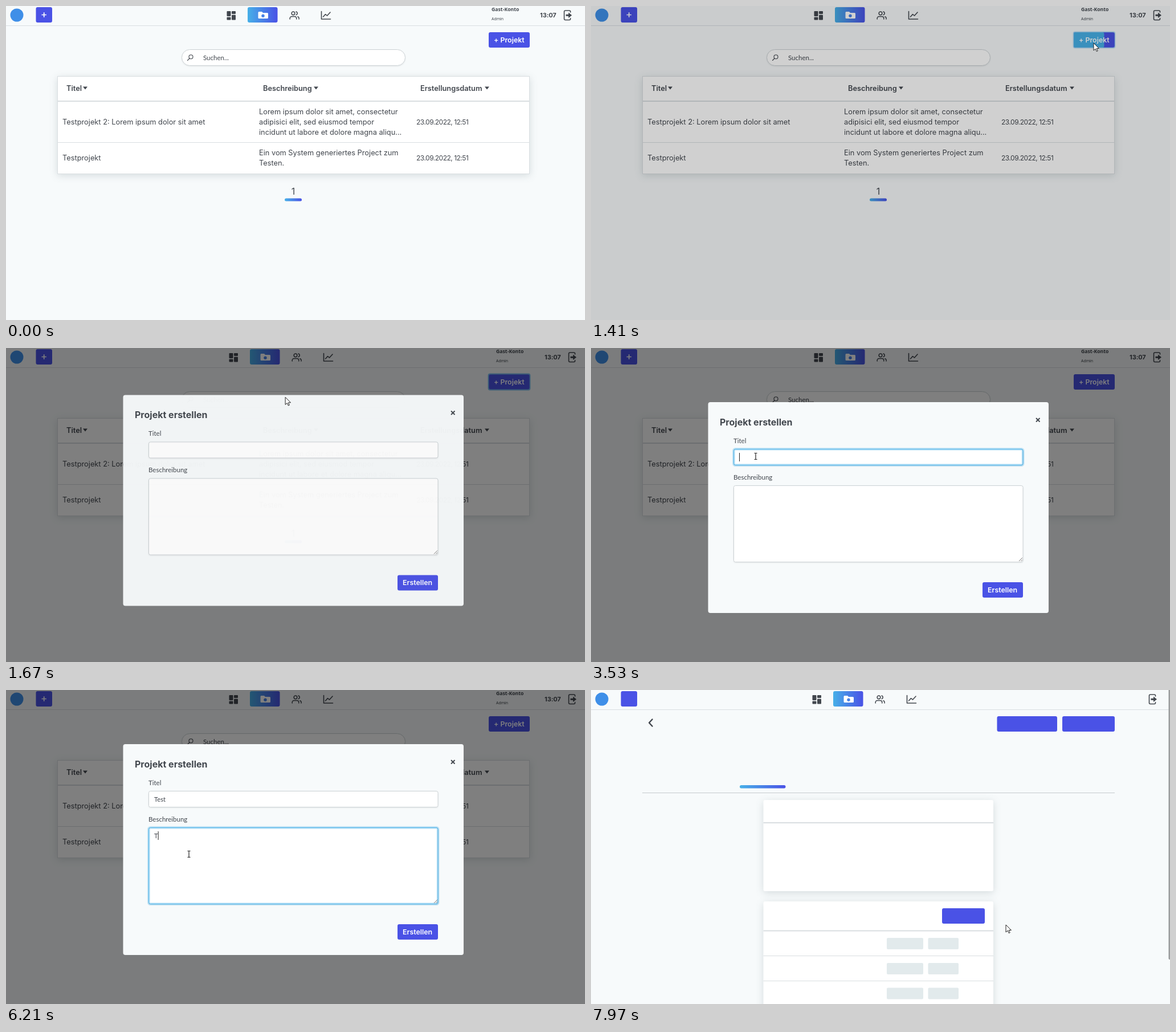
An HTML page for the animation above (8000 ms loop, 1016 by 551 pixels).

```html
<!DOCTYPE html>
<html lang="de">
<head>
<meta charset="utf-8">
<title>Projekt erstellen</title>
<style>
  html, body { margin: 0; width: 100%; height: 100%; overflow: hidden; background: #f7fafb; }
  svg { display: block; width: 100vw; height: 100vh; }
  text { font: 12.8px Inter, sans-serif; fill: #42474e; white-space: pre; }
  text.head { font-weight: 600; }
  text.date { font-size: 12px; letter-spacing: -.5px; }
  text.form { font: 11.5px Lato, sans-serif; }
  text.on-button { font-weight: 600; font-size: 12.4px; fill: #fff; }
  .button { fill: #4a52e6; }
  .light { fill: #47b0e8; }
  .card { fill: #fff; filter: drop-shadow(0 3px 7px rgba(40, 60, 70, .16)); }
  .rule { stroke: #d9dee1; fill: none; }
  .icon { fill: none; stroke: #42474e; stroke-width: 1.6; stroke-linecap: round; stroke-linejoin: round; }
  .solid { fill: #42474e; }
  .field { fill: #fff; stroke: #ccd2d5; filter: drop-shadow(0 1px 1px rgba(0, 0, 0, .08)); }
  .ring rect { fill: none; stroke: #47b0e8; }
  .ring rect:first-child { stroke-width: 5; stroke-opacity: .3; }
  .pill { fill: #e2eaec; }
</style>
</head>
<body>
<svg viewBox="0 0 1016 551" preserveAspectRatio="none">
  <defs>
    <linearGradient id="blend"><stop stop-color="#47b0e8"/><stop offset="1" stop-color="#4a52e6"/></linearGradient>
  </defs>
  <rect width="1016" height="551" fill="#f7fafb"/>

  <g id="header">
    <path class="rule" d="M0 34.5H1016"/>
    <circle cx="19" cy="16" r="11.5" fill="#3f8fe8"/>
    <rect class="button" x="52.5" y="2" width="28.5" height="27" rx="3"/>
    <path class="words" d="M62.5 15.5h8.4M66.7 11.3v8.4" stroke="#fff" stroke-width="1.7"/>
    <g id="nav">
      <g class="solid">
        <rect x="387.5" y="9" width="7" height="9" rx="1"/><rect x="387.5" y="19.5" width="7" height="5" rx="1"/>
        <rect x="396" y="9" width="7" height="5" rx="1"/><rect x="396" y="15.5" width="7" height="9" rx="1"/>
      </g>
      <rect x="424" y="2" width="52.5" height="27" rx="3" fill="url(#blend)"/>
      <path d="M444 10h5l2 2h7.500q1.500 0 1.500 1.500v7q0 1.500-1.500 1.500h-14.500q-1.500 0-1.500-1.500v-9q0-1.500 1.500-1.500z" fill="#fff"/>
      <circle cx="451" cy="17.300" r="2.700" fill="#4781e7"/>
      <g class="icon" transform="translate(497.500 7.800) scale(.72)" style="stroke-width:2.100">
        <path d="M17 21v-2a4 4 0 0 0-4-4H5a4 4 0 0 0-4 4v2M23 21v-2a4 4 0 0 0-3-3.870M16 3.130a4 4 0 0 1 0 7.750"/>
        <circle cx="9" cy="7" r="4"/>
      </g>
      <path class="icon" d="M553.500 9.500v13.500h16M556.500 19l4-4.500 3 2.500 5.500-6"/>
    </g>
    <g id="account">
      <g class="words">
        <text x="852" y="9" style="font:600 8.700px 'Noto Sans',sans-serif">Gast-Konto</text>
        <text x="852" y="25" style="font:6.900px 'Noto Sans',sans-serif">Admin</text>
        <text x="937" y="20" style="font-weight:700;font-size:11px;letter-spacing:-.1px">13:07</text>
      </g>
      <path class="icon" d="M990.500 11v-1a2 2 0 0 0-2-2h-7a2 2 0 0 0-2 2v12.500a2 2 0 0 0 2 2h7a2 2 0 0 0 2-2v-1"/>
      <path class="solid" d="M982.500 14.800h4.500v-3.300l6 4.800-6 4.800v-3.300h-4.500z"/>
    </g>
  </g>

  <g id="list">
    <rect class="button" x="847" y="46" width="72" height="27" rx="3"/>
    <rect class="light" id="newHover" x="847" y="46" height="27" rx="3"/>
    <rect id="newFocus" x="846.500" y="45.500" width="73" height="28" rx="3" fill="none" stroke="#7cc0f0" stroke-width="1.800"/>
    <text class="on-button" x="856" y="63.500">+ Projekt</text>

    <rect class="field" x="308.500" y="76.500" width="392" height="28" rx="14"/>
    <g class="icon" style="stroke-width:1.100"><circle cx="324.500" cy="89.300" r="3.500"/><path d="M322 92l-3.500 3.500"/></g>
    <text class="form" x="346" y="94.500">Suchen...</text>

    <rect class="card" x="90" y="123" width="829" height="171.500"/>
    <rect class="rule" x="90.500" y="123.500" width="828" height="171"/>
    <path class="rule" d="M90 167H919" stroke-width="2"/>
    <path class="rule" d="M90 239.500H919"/>
    <text class="head" x="106" y="148.500">Titel</text>
    <text class="head" x="451" y="148.500">Beschreibung</text>
    <text class="head" x="727" y="148.500">Erstellungsdatum</text>
    <path class="solid" d="M135 141.500h8l-4 5zM540 141.500h8l-4 5zM840 141.500h8l-4 5z"/>
    <text x="99" y="207.500">Testprojekt 2: Lorem ipsum dolor sit amet</text>
    <text x="444" y="189.500">Lorem ipsum dolor sit amet, consectetur</text>
    <text x="444" y="207.500">adipisici elit, sed eiusmod tempor</text>
    <text x="444" y="225.500">incidunt ut labore et dolore magna aliqu...</text>
    <text class="date" x="720" y="207.500">23.09.2022, 12:51</text>
    <text x="99" y="271">Testprojekt</text>
    <text x="444" y="262">Ein vom System generiertes Project zum</text>
    <text x="444" y="280">Testen.</text>
    <text class="date" x="720" y="271">23.09.2022, 12:51</text>
    <text x="504" y="330.500" text-anchor="middle" style="font-size:16px">1</text>
    <rect x="489" y="337.500" width="30" height="5" rx="2.500" fill="url(#blend)"/>
  </g>

  <g id="detail">
    <path class="icon" d="M107.500 51.500l-5.500 6 5.500 6" style="stroke-width:2.400"/>
    <rect class="button" x="712.500" y="46" width="105.500" height="27" rx="3"/>
    <rect class="button" x="827" y="46" width="92" height="27" rx="3"/>
    <rect x="261" y="167" width="80.500" height="5.500" rx="2.700" fill="url(#blend)"/>
    <path d="M90 180.500H919" stroke="#c5cacd"/>
    <rect class="card" x="302.500" y="193" width="403.500" height="160" rx="3"/>
    <rect class="card" x="302.500" y="371" width="403.500" height="200" rx="3"/>
    <path class="rule" d="M302.500 233H706M302.500 422.500H706" stroke-width="2"/>
    <path class="rule" d="M302.500 466.500H706M302.500 510.500H706"/>
    <rect class="button" x="616" y="383" width="75" height="27" rx="3"/>
    <g id="pills"></g>
    <rect x="1013.500" y="-4" width="5" height="477" rx="2" fill="#9a9c9d"/>
  </g>

  <rect id="backdrop" width="1016" height="551"/>

  <g id="modal">
    <rect x="205.500" y="95" width="597.500" height="370" rx="4" fill="#f7fafb"/>
    <text x="226" y="135.500" style="font-weight:700;font-size:16px">Projekt erstellen</text>
    <path d="M781 123l6.500 6.500M787.500 123l-6.500 6.500" stroke="#42474e" stroke-width="1.900"/>
    <text class="form" x="250" y="166.500">Titel</text>
    <text class="form" x="250" y="230.500">Beschreibung</text>
    <g id="fields"></g>
    <path d="M751 374l6-6M754.500 374l2.500-2.500" stroke="#777"/>
    <rect class="button" x="687" y="411" width="71" height="27" rx="3"/>
    <rect class="light" id="createHover" x="687" y="411" height="27" rx="3"/>
    <text class="on-button" x="696" y="428.500">Erstellen</text>
  </g>

  <g id="pointer">
    <path id="arrow" d="M0 0v13l3.200-2.800 2 4.500 2-.9-2-4.300h4.200z" fill="#fff" stroke="#222"/>
    <path id="beam" d="M-2.500-5.500h2l.5.500.5-.5h2M0-5v10M-2.500 5.500h2l.5-.5.5.5h2" fill="none" stroke="#222" stroke-width="1.200"/>
  </g>
</svg>
<script>
const LOOP = 8000, BLINK = 530;
const SHADE = 1356, CLOSE = 7750, DETAIL = 7970;
const $ = id => document.getElementById(id);

const fields = [
  { y: 177.5, height: 28, focus: 2470, blur: 5960, text: 'Test ', keys: [3730, 3930, 4060, 4330, 4600] },
  { y: 241.5, height: 134, focus: 5960, blur: LOOP, text: 'Test', keys: [6210, 6400, 6530, 6670] },
];

// time, x, y of the pointer tip
const route = [
  [120, 992, 552], [400, 975, 400], [920, 909, 80], [1010, 884, 66], [1060, 882, 65], [1420, 882, 65],
  [1540, 731, 70], [1670, 491, 86], [1820, 360, 140], [2000, 296, 184], [2130, 289, 190], [5680, 289, 190],
  [5930, 321, 288], [6750, 321, 288], [6950, 560, 405], [7100, 742, 486], [7200, 737, 468], [7270, 734, 452],
  [7430, 728, 412], [LOOP, 728, 412],
];

$('pills').innerHTML = [435, 479, 522.5].map(y =>
  `<rect class="pill" x="519" y="${y}" width="64" height="20" rx="2"/>
   <rect class="pill" x="591.5" y="${y}" width="53.500" height="20" rx="2"/>`).join('');

for (const f of fields) {
  const box = `x="250.500" y="${f.y}" width="507.500" height="${f.height}" rx="3"`;
  $('fields').insertAdjacentHTML('beforeend', `<g><rect class="field" ${box}/>
    <g class="ring"><rect ${box}/><rect ${box}/></g>
    <text class="form" x="260" y="${f.y + 18}" style="font-size:11.200px"></text>
    <rect class="caret" y="${f.y + 6.500}" width="1" height="15" fill="#222"/></g>`);
  const group = $('fields').lastElementChild;
  f.ring = group.querySelector('.ring');
  f.label = group.querySelector('text');
  f.caret = group.querySelector('.caret');
}

const ramp = (t, from, to) => Math.min(1, Math.max(0, (t - from) / (to - from)));

function bezier(x1, y1, x2, y2) {
  const at = (u, a, b) => 3 * (1 - u) ** 2 * u * a + 3 * (1 - u) * u * u * b + u ** 3;
  return x => {
    let low = 0, high = 1;
    for (let i = 0; i < 24; i++) {
      const mid = (low + high) / 2;
      if (at(mid, x1, x2) < x) low = mid; else high = mid;
    }
    return at(high, y1, y2);
  };
}
const ease = bezier(.25, .1, .25, 1), easeOut = bezier(0, 0, .58, 1);
const show = (node, visible) => node.style.display = visible ? '' : 'none';
const move = (node, x, y = 0) => node.setAttribute('transform', `translate(${x} ${y})`);

function pointerAt(t) {
  const i = Math.max(1, route.findIndex(p => p[0] > t));
  const [t0, x0, y0] = route[i - 1], [t1, x1, y1] = route[i];
  const k = ramp(t, t0, t1);
  return [x0 + (x1 - x0) * k, y0 + (y1 - y0) * k];
}

function drawField(f, t) {
  const typed = f.keys.filter(k => k <= t);
  const lastInput = typed.length ? typed[typed.length - 1] : f.focus;
  const focused = t >= f.focus && t < f.blur;
  f.label.textContent = f.text.slice(0, typed.length);
  f.ring.style.opacity = ramp(t, f.focus, f.focus + 150) - ramp(t, f.blur, f.blur + 150);
  f.caret.setAttribute('x', 260 + (typed.length ? f.label.getComputedTextLength() : 0));
  show(f.caret, focused && Math.floor((t - lastInput) / BLINK) % 2 === 0);
}

function draw(t) {
  const detail = t >= DETAIL, shaded = t >= SHADE && !detail;
  show($('list'), !detail);
  show($('detail'), detail);
  show($('modal'), shaded);
  document.querySelectorAll('.words').forEach(node => show(node, !detail));
  move($('nav'), detail ? 1 : shaded ? 4 : 0);
  move($('account'), shaded ? 8 : 0);

  const newHover = ease(ramp(t, 1000, 1300)) - ease(ramp(t, SHADE, SHADE + 300));
  $('newHover').setAttribute('width', 72 * newHover);
  $('newFocus').style.opacity = ramp(t, 1330, 1480) - ramp(t, 1800, 1950);
  $('createHover').setAttribute('width', 71 * ease(ramp(t, 7310, 7610)));

  $('backdrop').style.opacity = detail ? 0 : .5 * (ramp(t, SHADE, 1506) - ramp(t, 7850, DETAIL));
  $('modal').style.opacity = ramp(t, 1510, 1678) - ramp(t, CLOSE, 7900);
  move($('modal'), 0, 50 * (easeOut(ramp(t, 1446, 1846)) - 1 - easeOut(ramp(t, CLOSE, CLOSE + 300))));
  if (shaded) fields.forEach(f => drawField(f, t));

  const [x, y] = pointerAt(t);
  const overField = t > 1700 && t < CLOSE && x > 250 && x < 758 &&
    fields.some(f => y > f.y && y < f.y + f.height);
  move($('pointer'), x, y);
  show($('beam'), overField);
  show($('arrow'), !overField);
}

const start = performance.now();
function frame() {
  draw((performance.now() - start) % LOOP);
  requestAnimationFrame(frame);
}
frame();
</script>
</body>
</html>
```
